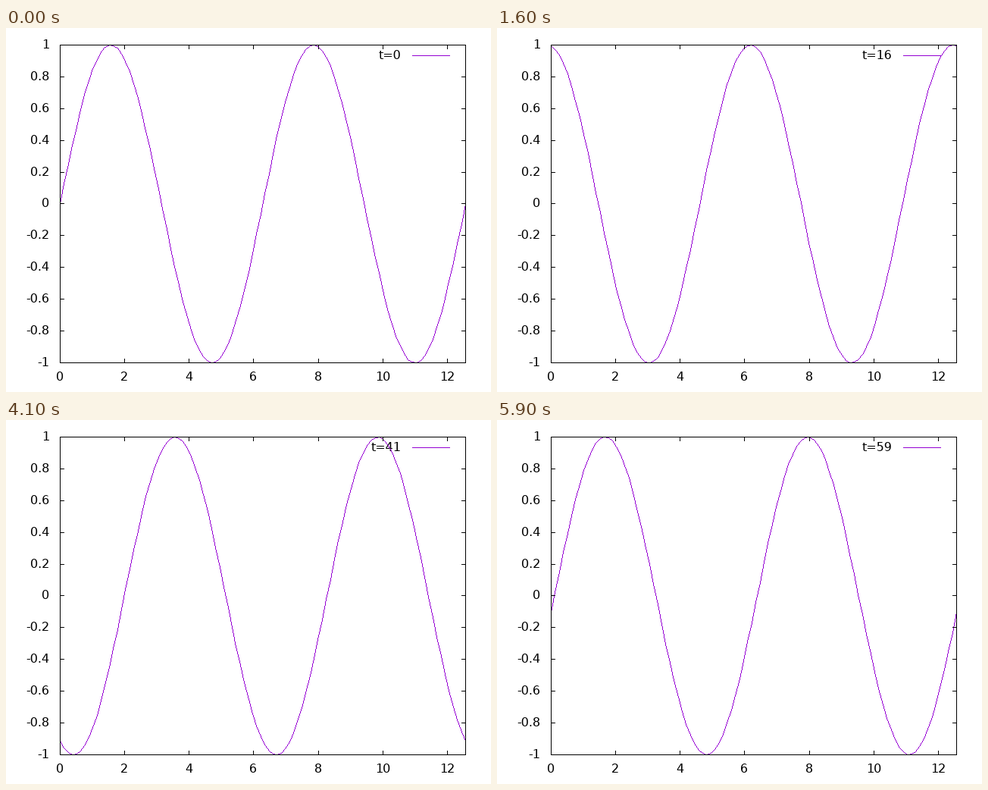
A matplotlib script for the animation above (6 s loop, 640 px wide and 480 px high).

```python
import numpy as np
import matplotlib.pyplot as plt
from matplotlib.animation import FuncAnimation
from matplotlib.collections import PolyCollection
from matplotlib.patches import Rectangle

W, H, DPI = 640, 480, 80
LEFT, RIGHT, TOP, BOTTOM = 71, 606, 22, 441
FRAMES, SAMPLES, TIC = 60, 100, 5
X_MAX = 4 * np.pi
PURPLE = "#9400d3"

plt.rcParams.update({
    "font.family": "DejaVu Sans",
    "font.size": 16 * 72 / DPI,
    "text.hinting": "default",
})

fig = plt.figure(figsize=(W / DPI, H / DPI), dpi=DPI, facecolor="white")
ax = fig.add_axes([0, 0, 1, 1])
ax.set(xlim=(0, W), ylim=(H, 0))
ax.axis("off")


def snap(v):
    return np.floor(v + 0.5).astype(int)


def to_px(x, y):
    """Data coordinates to whole pixels."""
    px = LEFT + snap(np.asarray(x) / X_MAX * (RIGHT - LEFT))
    py = BOTTOM - snap((np.asarray(y) + 1) / 2 * (BOTTOM - TOP))
    return px, py


def bar(x0, y0, x1, y1, color="black", z=3):
    """One-pixel line, both ends included."""
    ax.add_patch(Rectangle((x0, y0), x1 - x0 + 1, y1 - y0 + 1,
                           fc=color, lw=0, aa=False, zorder=z))


def label(x, y, s):
    return ax.text(x, y + 5, s, ha="left", va="baseline", zorder=1)


def trace(px, py):
    """Pixels along a polyline, one per step of the longer axis."""
    parts = []
    for x0, y0, x1, y1 in zip(px, py, px[1:], py[1:]):
        n = max(abs(x1 - x0), abs(y1 - y0))
        k = np.arange(n + 1) / n
        parts.append(np.column_stack([snap(x0 + (x1 - x0) * k),
                                      snap(y0 + (y1 - y0) * k)]))
    return np.concatenate(parts)


# Border
for y in (TOP, BOTTOM):
    bar(LEFT, y, RIGHT, y)
for x in (LEFT, RIGHT):
    bar(x, TOP, x, BOTTOM)

# Tics and their labels
for v in range(0, 13, 2):
    x, _ = to_px(v, 0)
    bar(x, TOP, x, TOP + TIC)
    bar(x, BOTTOM - TIC, x, BOTTOM)
    label(x - 5 * len(str(v)), BOTTOM + 19, str(v))

START = {1: 47, 2: 41, 3: 32, 4: 26}
for i in range(-5, 6):
    _, y = to_px(0, i / 5)
    bar(LEFT, y, LEFT + TIC, y)
    bar(RIGHT - TIC, y, RIGHT, y)
    s = f"{i / 5:g}"
    label(START[len(s)], y, s)

# Key
key = label(492, 36, "t=0")
bar(536, 36, 585, 36, PURPLE, z=2)

# Curve
xs = np.linspace(0, X_MAX, SAMPLES)
SQUARE = np.array([[0, 0], [1, 0], [1, 1], [0, 1]])
curve = PolyCollection([], facecolors=PURPLE, edgecolors="none",
                       linewidths=0, antialiaseds=False, zorder=2)
ax.add_collection(curve, autolim=False)


def update(t):
    px, py = to_px(xs, np.sin(xs + 2 * np.pi * t / FRAMES))
    curve.set_verts(trace(px, py)[:, None, :] + SQUARE)
    key.set_text(f"t={t}")
    key.set_x(502 - 10 * len(str(t)))
    return curve, key


anim = FuncAnimation(fig, update, frames=FRAMES, interval=100,
                     init_func=lambda: update(0), repeat=True, repeat_delay=0)
plt.show()
```
